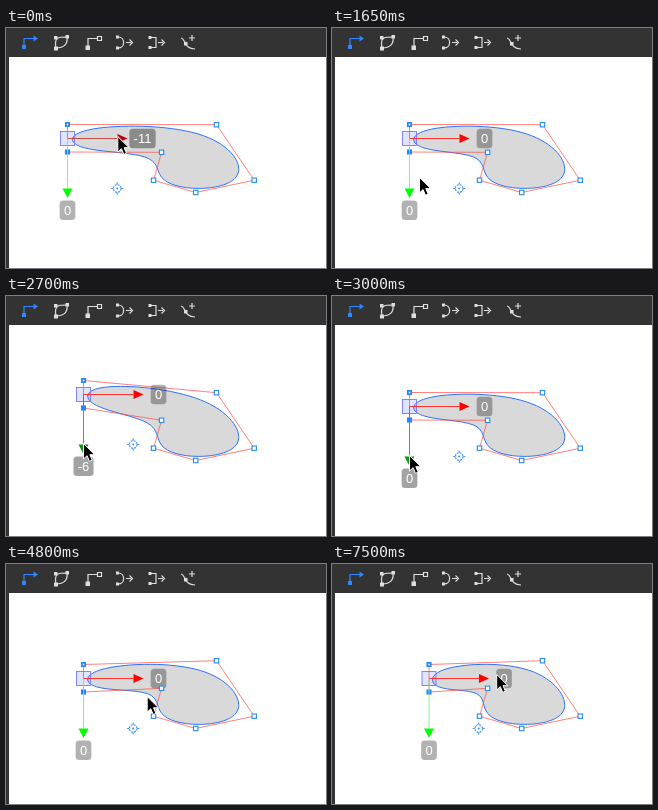
Animation, 320 px wide and 240 px high, one loop 8000 ms. Source, as an HTML page:

```html
<!DOCTYPE html>
<html lang="en">
<head>
<meta charset="utf-8">
<title>Spline handle editing</title>
<style>
  html, body { margin: 0; width: 100%; height: 100%; overflow: hidden; background: #fff; }
  svg { display: block; width: 100vw; height: 100vh; }
  text { font: 13px "Liberation Sans", Arial, sans-serif; fill: #fff; }
  .icon { fill: none; stroke: #dedede; stroke-width: 1.2; }
  .icon .solid { fill: #dedede; stroke: none; }
  .icon.on { stroke: #2f86ff; }
  .icon.on .solid { fill: #2f86ff; }
  .knob { fill: #fff; stroke: #268bee; stroke-width: 1.1; }
  .picked { fill: #2588f2; stroke: #2588f2; }
  .pivot { fill: none; stroke: #3b92ee; stroke-width: 1.1; }
  #hull { fill: none; stroke: #ff4a42; stroke-width: .7; }
  #blob { fill: #d9d9d9; stroke: #2d72fa; stroke-width: 1; }
</style>
</head>
<body>
<svg viewBox="0 0 320 240">
  <rect width="320" height="240" fill="#fff"/>
  <path d="M0 0H320V29H3V240H0Z" fill="#333"/>

  <g class="icon on">
    <path d="M18 18V10.5H28"/>
    <path class="solid" d="M16 17h4v4h-4zM27.500 7.500l4.500 3-4.500 3z"/>
  </g>
  <g class="icon">
    <path d="M50 20C48 9 52 9 61 9C62 16 58 20 50 20"/>
    <path class="solid" d="M48 18.500h4v4h-4zM48 8h3.500v3.500h-3.500zM59.500 7h3.500v3.500h-3.500z"/>
  </g>
  <g class="icon">
    <path d="M82 19V10.500H91M91.500 8.500h4v4h-4z"/>
    <path class="solid" d="M79.500 17.500h4.500v4.500h-4.500z"/>
  </g>
  <g class="icon">
    <path d="M112 9C119.500 9 119.500 20 112 20M120 14.500h5M123.500 11.500l3 3-3 3"/>
    <path class="solid" d="M110 7.500h3v3h-3zM110 18.500h3v3h-3z"/>
  </g>
  <g class="icon">
    <path d="M144.500 9.500h5.500v10h-5.500M152 14.500h5M155.500 11.500l3 3-3 3"/>
    <path class="solid" d="M142.500 8h3v3h-3zM142.500 18h3v3h-3z"/>
  </g>
  <g class="icon">
    <path d="M175 10C180 11 178 21 189 21M186 7v6M183 10h6"/>
    <path class="solid" d="M178 14h3.500v3.500h-3.500z"/>
  </g>

  <path id="blob"/>
  <path id="hull"/>

  <g id="rig">
    <rect x="-7" y="-7" width="14" height="14" fill="#5b6bff" fill-opacity=".18" stroke="#777bf2" stroke-width=".9"/>
    <rect class="knob picked" x="-2" y="-16" width="4" height="4"/>
    <rect x="-.8" y="-14.800" width="1.600" height="1.600" fill="#fff"/>
    <rect class="knob picked" x="-2" y="11.500" width="4" height="4"/>
    <path id="redLine" d="M0 0H50" stroke-width=".9"/>
    <path id="redTip" d="M50-4.500L60 0L50 4.500Z"/>
    <path id="greenLine" d="M0 0V50" stroke-width=".9"/>
    <path id="greenTip" d="M-5 50H5L0 59.500Z"/>
    <g class="pivot" transform="translate(49.700 50)">
      <circle r="3.800" stroke-dasharray="1.990 .995"/>
      <path d="M0-6V-4M0 6V4M-6 0H-4M6 0H4"/>
      <circle r=".5"/>
    </g>
    <g id="labelX" transform="translate(75 0)"><rect y="-9.700" height="19.400" rx="3.500"/><text y="4.700" text-anchor="middle"></text></g>
    <g id="labelY" transform="translate(0 71.700)"><rect y="-9.700" height="19.400" rx="3.500"/><text y="4.700" text-anchor="middle"></text></g>
  </g>

  <g id="field">
    <rect x="136.500" y="103.500" width="31" height="21" rx="1.500" fill="#7c8694" fill-opacity=".18" stroke="#639dea" stroke-opacity=".85" stroke-width="3"/>
    <rect id="selection" x="137.500" y="106" width="8" height="16" fill="#a4cbf8"/>
    <text id="entry" x="137.500" y="119"></text>
  </g>
  <g id="knobs"></g>

  <path id="arrow" d="M0 0V15.500L3.600 12.200L6 17.900L8.700 16.700L6.300 11.200H11.300Z" fill="#000" stroke="#fff" stroke-width="1" stroke-linejoin="round"/>
  <g id="beam" fill="none" transform="translate(165.500 113)">
    <path id="beamShape" d="M-3-7.500Q0-7.500 0-5Q0-7.500 3-7.500M0-5V5M-3 7.500Q0 7.500 0 5Q0 7.500 3 7.500M-1.500 2.500H1.500" stroke="#fff" stroke-width="3"/>
    <path d="M-3-7.500Q0-7.500 0-5Q0-7.500 3-7.500M0-5V5M-3 7.500Q0 7.500 0 5Q0 7.500 3 7.500M-1.500 2.500H1.500" stroke="#000" stroke-width="1.200"/>
  </g>
</svg>
<script>
const LOOP = 8000, TICK = 150;
const $ = id => document.getElementById(id);
const set = (el, attrs) => { for (const k in attrs) el.setAttribute(k, attrs[k]); };
const show = (id, on) => set($(id), { visibility: on ? "visible" : "hidden" });

const fixed = [[210.5, 96.7], [248.2, 152.2], [189.7, 164.5], [147.5, 152.2], [155.6, 124.3]];
const dragX = [-11, -9, -7, -5, -3];
const dragY = [0, -6, -11, -13, -10, -6, -3, 0, 0, 1, 2];
const toField = [[78, 150], [100, 131.5], [124.5, 143]];
const overField = [[141.2, 132.6], [149, 122], [157, 114], [163, 111]];

$("knobs").innerHTML = fixed.map(([x, y]) =>
  `<rect class="knob" x="${x - 2.2}" y="${y - 2.2}" width="4.4" height="4.4"/>`).join("");

// Holds each listed value for one tick, then keeps the last one.
function step(t, start, values) {
  const i = Math.floor((t - start) / TICK);
  return values[Math.max(0, Math.min(values.length - 1, i))];
}

// Closed uniform cubic B-spline written as Bezier segments.
function spline(pts) {
  const n = pts.length;
  const mix = (a, b, k) => a.map((v, i) => v + (b[i] - v) * k);
  const knot = i => {
    const p = pts[i % n], before = pts[(i + n - 1) % n], after = pts[(i + 1) % n];
    return mix(mix(p, before, 1 / 3), mix(p, after, 1 / 3), .5);
  };
  let d = "M" + knot(0);
  for (let i = 0; i < n; i++) {
    const p = pts[i], q = pts[(i + 1) % n];
    d += "C" + [mix(p, q, 1 / 3), mix(p, q, 2 / 3), knot(i + 1)].join(" ");
  }
  return d + "Z";
}

function label(id, value, active) {
  const [box, text] = $(id).children;
  text.textContent = value;
  const w = text.getComputedTextLength() + 8.5;
  set(box, { x: -w / 2, width: w, fill: "#000", "fill-opacity": active ? .36 : .3 });
}

function pointer(t, x, y) {
  if (t < 1050) return [x + 50.3, 108.5];
  if (t < 1950) {
    const k = (Math.floor((t - 1050) / TICK) + 1) / 7;
    const e = k * k * (3 - 2 * k);
    return [127.8 - 50.3 * e, 108.5 + 51 * e];
  }
  if (t < 3900) return [77.5, y + 49];
  if (t < 4800) return step(t, 3900, toField);
  if (t < 7350) return step(t, 4800, overField);
  return [164.7, 110.5];
}

function draw(t) {
  const shiftX = step(t, 0, dragX), shiftY = step(t, 1950, dragY);
  const x = t < 7350 ? 83.5 + 2 * shiftX : 97;
  const y = 110.5 + 2 * shiftY;
  const pts = [[x, y - 14], ...fixed, [x, y + 13.5]];
  set($("blob"), { d: spline(pts) });
  set($("hull"), { d: "M" + pts.join("L") + "Z" });
  set($("rig"), { transform: `translate(${x} ${y})` });

  const onRed = t < 1200, onGreen = t >= 1800 && t < 3900;
  set($("redLine"), { stroke: onRed ? "#c93a3a" : "#f22" });
  set($("redTip"), { fill: onRed ? "#c4000c" : "#f00" });
  set($("greenLine"), { stroke: onGreen ? "#3c9a3c" : "#8be88b" });
  set($("greenTip"), { fill: onGreen ? "#0a9a0a" : "#0f0" });
  label("labelX", t < 1050 ? shiftX : 0, t < 1050);
  label("labelY", t < 3900 ? shiftY : 0, t >= 2100 && t < 3900);

  const editing = t >= 5550 && t < 7350;
  const typing = t >= 5400 && t < 7500;
  show("labelX", !editing);
  show("field", editing);
  show("selection", t >= 5700 && t < 6750);
  $("selection").style.display = editing ? "" : "none";
  $("entry").textContent = !editing ? "" : t < 6750 ? "0" : "10";
  show("arrow", !typing);
  show("beam", typing);
  set($("arrow"), { transform: `translate(${pointer(t, x, y)})` });
}

function frame() {
  draw(performance.now() % LOOP);
  requestAnimationFrame(frame);
}
frame();
</script>
</body>
</html>
```
